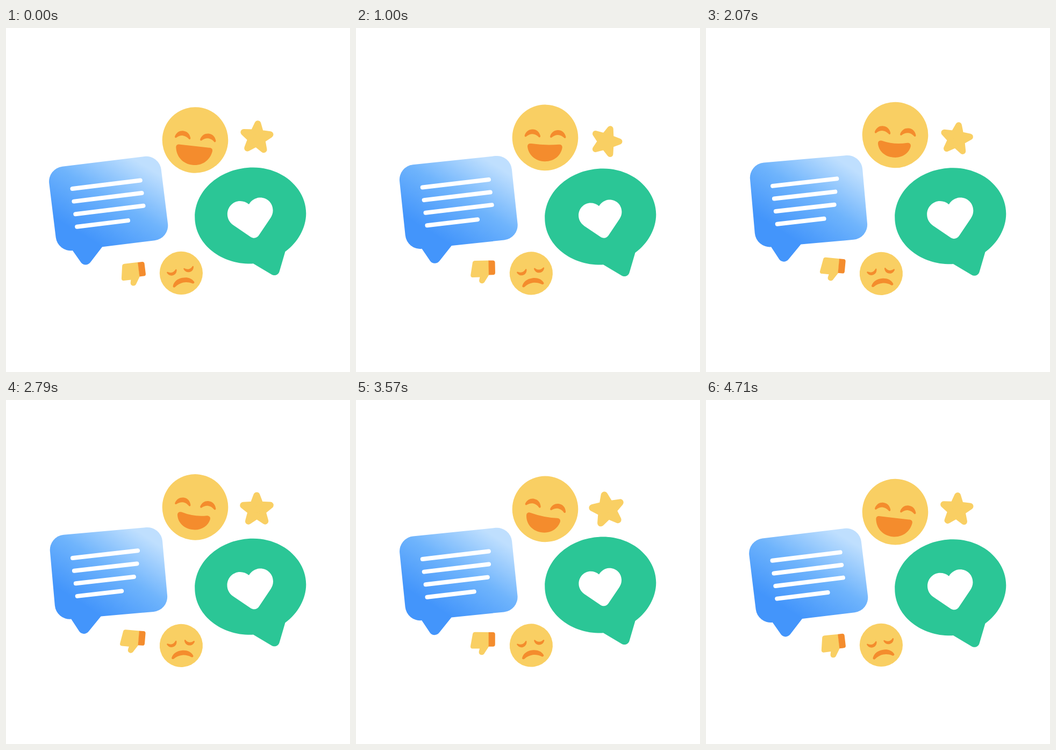
Write an HTML page that moves like this. It is 640x640 px and loops after 4.78 s.

```html
<!DOCTYPE html>
<html lang="en">
<head>
<meta charset="utf-8">
<title>Reactions</title>
<style>
  html, body { margin: 0; width: 100%; height: 100%; overflow: hidden; background: #fff; }
  svg { display: block; width: 100%; height: 100%; }
  .yellow { fill: #f9cf63; }
  .orange { fill: #f48c2d; }
  .green { fill: #2bc696; }
  .white { fill: #fff; }
  #lines { fill: none; stroke: #fff; stroke-width: 8; stroke-linecap: round; }
  #star { stroke: #f9cf63; stroke-width: 12; stroke-linejoin: round; }
</style>
</head>
<body>
<svg viewBox="0 0 640 640">
  <defs>
    <linearGradient id="sky" gradientUnits="userSpaceOnUse" x1="-42" y1="62" x2="62" y2="-72">
      <stop offset="0" stop-color="#4395fb"/>
      <stop offset=".5" stop-color="#6fb4fc"/>
      <stop offset="1" stop-color="#bfdffe"/>
    </linearGradient>
    <path id="arc" d="M-14.6 4.1C-12-3.9-6.5-7.4 0-7.4S12-3.9 14.6 4.1C15.2 6.6 13.2 7.8 11.8 6.6C8 3.1 4 1.4 0 1.4S-8 3.1-11.8 6.6C-13.2 7.8-15.2 6.6-14.6 4.1Z"/>
  </defs>

  <path id="note" fill="url(#sky)" d="M-77-78.7H77A28 28 0 0 1 105-50.7V50.7A28 28 0 0 1 77 78.7H-21.4L-46.6 104.4C-51.5 109.6-60 109.6-64 103L-77 78.7A28 28 0 0 1-105 50.7V-50.7A28 28 0 0 1-77-78.7Z"/>
  <path id="lines"/>

  <g id="bubble">
    <path class="green" d="M460 259.5C514 259.5 558.3 298 558.3 345C558.3 372 543 399 519.5 416L508.8 452.5C507 459.5 500 462 494 458.5L460 438.3C457 438.6 453 438.6 450 438.5C396 437 351.3 399.5 351.3 352C351.3 301 400 259.5 460 259.5Z"/>
    <path id="heart" class="white" d="M452 328C456 321 464 316 471.5 315.6C485.5 315 496.5 325.5 496.5 339.5C496.5 345 494.5 349.5 492 353.5L470.5 385.5C467 390.8 461 392 455.5 388.8L423 366.8C415.5 361.5 412 354 412 346.5C412 332.5 423 322 435.5 322C441.5 322 447.5 324 452 328Z"/>
  </g>

  <g id="happy">
    <circle class="yellow" r="61.3"/>
    <g class="orange">
      <use href="#arc" x="-23.7" y="-7.2"/>
      <use href="#arc" x="23.7" y="-7.2"/>
      <path id="mouth"/>
    </g>
  </g>

  <g id="sad">
    <circle class="yellow" r="40.1"/>
    <g class="orange">
      <use id="eyeL" href="#arc"/>
      <use id="eyeR" href="#arc"/>
      <use href="#arc" transform="translate(.3 16.6) scale(1.38 1)"/>
    </g>
  </g>

  <g id="thumb">
    <path class="yellow" d="M-5.5-13.4L-31-13.6C-33.5-13.6-35-12.5-35.5-10L-39.5 12.5C-40 15.5-38.5 17.3-36 17.3H-22.5L-23.8 22.5C-24.5 27-21.5 29-18.5 29S-14 27-13 25L-5.5 13.4Z"/>
    <path class="orange" d="M-5.9-13.4H2.2A4 4 0 0 1 6.2-9.4V9.4A4 4 0 0 1 2.2 13.4H-5.9Z"/>
  </g>

  <path id="star" class="yellow"/>
</svg>
<script>
const LOOP = 4780, HALF = LOOP / 2, QUARTER = LOOP / 4;
const el = id => document.getElementById(id);
const set = (id, value, name = "transform") => el(id).setAttribute(name, value);
const place = (id, x, y, deg, size = 1) =>
  set(id, `translate(${x} ${y}) rotate(${deg}) scale(${size})`);

// Linear interpolation through [time, value] pairs
function track(t, keys) {
  const i = Math.max(1, keys.findIndex(key => key[0] >= t));
  const [t0, a] = keys[i - 1], [t1, b] = keys[i];
  return a + (b - a) * (t - t0) / (t1 - t0);
}

// Each text line: full right end, shortest right end, start and end of shrinking
const textLines = [
  [249.8, 242.2, 650, 1600],
  [252.6, 240.3, 680, 2080],
  [255.5, 234.4, 790, 2390],
  [227, 215.2, 850, 2790]
];

const starPoints = Array.from({ length: 10 }, (_, i) => {
  const a = i * Math.PI / 5, r = i % 2 ? 11 : 26;
  return `${r * Math.sin(a)} ${-r * Math.cos(a)}`;
});
set("star", `M${starPoints.join("L")}Z`, "d");

function mouthPath(k) {
  const w = 34 - 4 * k, top = 11.3 + 1.7 * k, low = 46.5 - 5.2 * k;
  const sag = top + 7 * k, cheek = low - (low - top) * 0.36;
  return `M${-w} ${top + 6}C${-w - 0.5} ${top + 1} ${3 - w} ${top - 0.5} ${7 - w} ${top}` +
    `Q0 ${sag} ${w - 7} ${top}` +
    `C${w - 3} ${top - 0.5} ${w + 0.5} ${top + 1} ${w} ${top + 6}` +
    `C${w * 0.93} ${cheek} ${w * 0.55} ${low} 0 ${low}` +
    `C${-w * 0.55} ${low} ${-w * 0.93} ${cheek} ${-w} ${top + 6}Z`;
}

function linesPath(t, k) {
  return textLines.map(([full, short, from, to], i) => {
    const x = 123.5 + 2.9 * i + 0.6 * k, y = 299 + 23.6 * i - 5.9 * k;
    const end = track(t, [[0, full], [from, full], [to, short], [LOOP, full]]);
    return `M${x} ${y}L${end} ${y - (end - x) * (0.123 - 0.011 * k)}`;
  }).join("");
}

function draw(t) {
  const k = track(t, [[0, 0], [HALF, 1], [LOOP, 0]]);
  const sway = track(t, [[0, 0], [QUARTER, 1], [LOOP - QUARTER, -1], [LOOP, 0]]);
  const beat = track(t, [[0, 84.8], [QUARTER, 79.6], [HALF, 88.7], [LOOP - QUARTER, 79.6], [LOOP, 84.8]]) / 84.6;

  place("note", 190.7 + 0.3 * k, 326.5 - 5 * k, -7 + 2.3 * k);
  set("lines", linesPath(t, k), "d");

  set("bubble", `translate(0 ${sway * (sway > 0 ? 2.4 : 5.1)})`);
  set("heart", `translate(454.2 353.1) scale(${beat}) translate(-454.2 -353.1)`);

  place("happy", 352, 208.5 - 11 * k, 6.3 - 5.2 * sway);
  set("mouth", mouthPath(k), "d");

  place("sad", 325.9, 455.9 + 1.1 * k, -11.5 + 7 * k);
  place("eyeL", -16.2, -3.6, 174.5 - 10 * k, 0.65);
  place("eyeR", 15.6, -3.6, 177.5 + 18 * k, 0.65);

  place("thumb", 252.6, 448.5 - 6.3 * k, -7 + 14 * k);
  place("star", 466.2 - sway, 204 + 8.5 * Math.max(0, sway), 5 + 16 * sway, (31.9 - 2.1 * sway) / 32);
}

let start;
function tick(now) {
  start ??= now;
  draw((now - start) % LOOP);
  requestAnimationFrame(tick);
}
draw(0);
requestAnimationFrame(tick);
</script>
</body>
</html>
```
